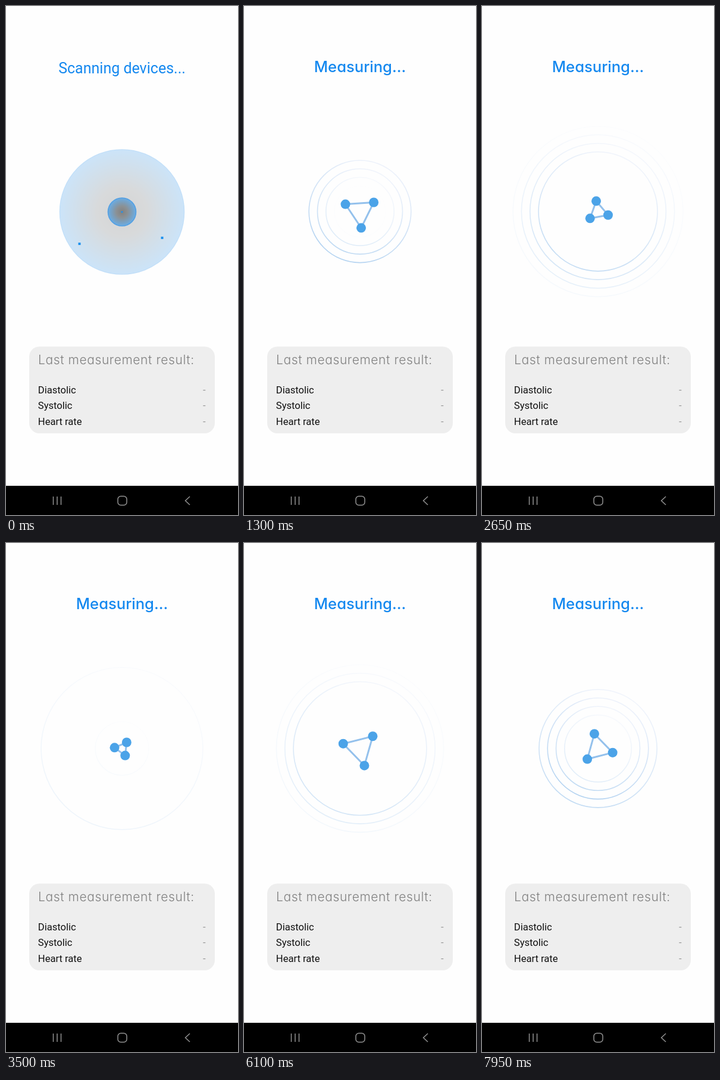
Recreate the animation shown at these times as an HTML page. Size 390x854 px, loop 8000 ms.

```html
<!DOCTYPE html>
<html lang="en">
<head>
<meta charset="utf-8">
<style>
  html, body { margin: 0; width: 100%; height: 100%; overflow: hidden; background: #fefefe; }
  svg { display: block; width: 100%; height: 100%; }
  text { font-family: Roboto, sans-serif; font-size: 16.6px; fill: #111; }
  .round { font-family: Inter, sans-serif; font-feature-settings: "cv11"; }
  .heading { font-size: 25px; fill: #1488ef; text-anchor: middle; }
  .round.heading { font-size: 25.6px; font-weight: 500; }
  .round.title { font-size: 21px; font-weight: 300; letter-spacing: .6px; fill: #808080; }
  .value { fill: #999; text-anchor: end; }
  .nav { fill: none; stroke: #929292; stroke-width: 1.5; }
</style>
</head>
<body>
<svg viewBox="0 0 390 854">
  <defs>
    <radialGradient id="rippleFill">
      <stop offset="0" stop-color="#5f5f5f"/>
      <stop offset=".4" stop-color="#6d7478"/>
      <stop offset="1" stop-color="#3c9beb"/>
    </radialGradient>
    <linearGradient id="ringStroke" x1=".25" y1="1" x2=".75" y2="0">
      <stop offset="0" stop-color="#aed0f0"/>
      <stop offset="1" stop-color="#f0f3fb"/>
    </linearGradient>
  </defs>

  <g id="scanning">
    <text class="heading" x="195" y="113">Scanning devices...</text>
    <g id="ripples"></g>
    <g fill="#1f92ee">
      <rect x="121.5" y="397" width="4" height="4"/>
      <rect x="260.5" y="387" width="4" height="4"/>
      <circle cx="195" cy="345.5" r="1.5"/>
    </g>
  </g>

  <g id="measuring">
    <text class="round heading" x="195" y="111">Measuring...</text>
    <g id="rings" fill="none" stroke="url(#ringStroke)" stroke-width="1.6"></g>
    <polygon id="links" fill="none" stroke="#94c1ec" stroke-width="3"/>
    <g id="nodes" fill="#4ba3e8"></g>
  </g>

  <rect x="39" y="571.5" width="312" height="145.5" rx="17" fill="#eee"/>
  <text class="round title" x="54" y="601">Last measurement result:</text>
  <g id="rows"></g>

  <rect y="805" width="390" height="49"/>
  <g class="nav">
    <path d="M79.5 823v14M86 823v14M92.5 823v14"/>
    <rect x="188" y="822.5" width="15" height="15" rx="5"/>
    <path d="M309 823l-7.5 7 7.5 7"/>
  </g>
</svg>

<script>
const LOOP = 8000, MEASURE_START = 640;
const CYCLE = 3168, RING_SPEED = 0.0423, RING_GAP = 14.3;
const SPIN = -0.22716, SPREAD = 33;
const CX = 195.2, CY = 344.8;

const $ = id => document.getElementById(id);
const clamp = v => Math.max(0, Math.min(1, v));

function add(parent, tag, attrs, text = '') {
  const el = document.createElementNS('http://www.w3.org/2000/svg', tag);
  set(el, attrs);
  el.textContent = text;
  return parent.appendChild(el);
}
function set(el, attrs) {
  for (const key in attrs) el.setAttribute(key, attrs[key]);
}
const circles = (parent, count, attrs) =>
  Array.from({ length: count }, () => add(parent, 'circle', attrs));

['Diastolic', 'Systolic', 'Heart rate'].forEach((label, i) => {
  const y = 650 + i * 26.3;
  add($('rows'), 'text', { x: 53.8, y }, label);
  add($('rows'), 'text', { x: 335.5, y, class: 'value' }, '-');
});

const ripples = circles($('ripples'), 2, {
  cx: 195, cy: 345.5, fill: 'url(#rippleFill)', stroke: '#1b88e8', 'stroke-width': 1.5
});
const rings = circles($('rings'), 12, { cx: 195, cy: CY });
const nodes = circles($('nodes'), 3, { r: 8 });

function drawScanning(t) {
  ripples.forEach((el, i) => {
    const r = [104.5, 23.5][i] + t * 0.05;
    set(el, { r, opacity: clamp(0.83 - r * 0.0055) });
  });
}

function drawMeasuring(t) {
  // Four rings leave per cycle, growing steadily while they fade in and out.
  rings.forEach((el, i) => {
    const age = t - 1300 - CYCLE * Math.floor(i / 4);
    const r = 85.8 + age * RING_SPEED - RING_GAP * (i % 4);
    const opacity = clamp(Math.min((r - 42) / 36, (150 - r) / 65));
    set(el, { r: Math.max(0, r), opacity });
  });

  // The triangle opens and closes linearly, twice per cycle, while it spins.
  const phase = ((t - MEASURE_START) / (CYCLE / 2)) % 1;
  const radius = SPREAD * (1 - Math.abs(2 * phase - 1));
  const turn = 86.5 + SPIN * (t - 1300);
  const points = nodes.map((el, i) => {
    const a = (turn + i * 120) * Math.PI / 180;
    const cx = CX + radius * Math.cos(a), cy = CY + radius * Math.sin(a);
    set(el, { cx, cy });
    return `${cx},${cy}`;
  });
  set($('links'), { points: points.join(' ') });
}

function frame() {
  const t = performance.now() % LOOP;
  const measuring = t >= MEASURE_START;
  $('scanning').style.display = measuring ? 'none' : '';
  $('measuring').style.display = measuring ? '' : 'none';
  (measuring ? drawMeasuring : drawScanning)(t);
  requestAnimationFrame(frame);
}
frame();
</script>
</body>
</html>
```
